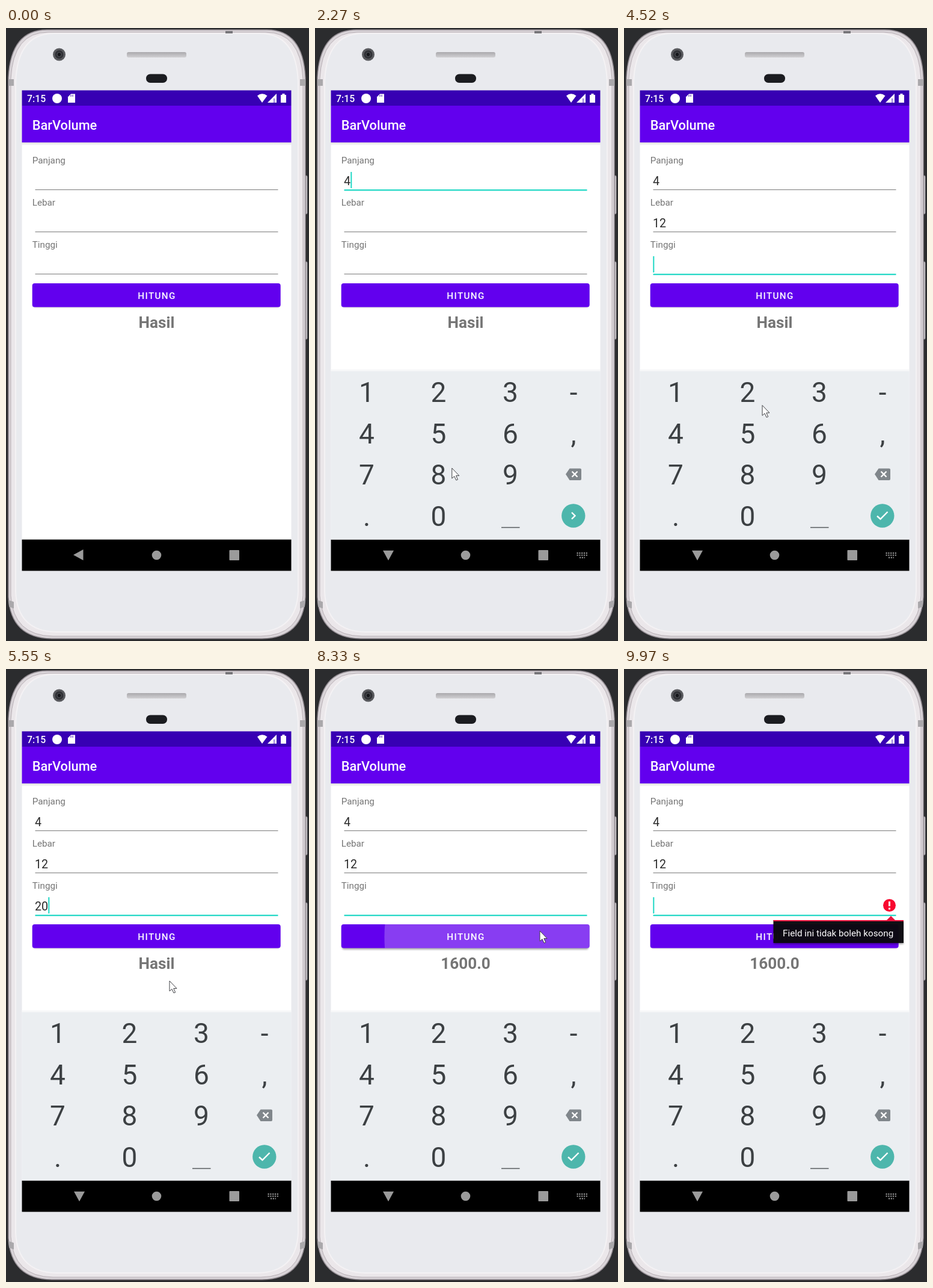
An HTML page that plays this animation: 504x1018 px, repeating every 10 s.

```html
<!DOCTYPE html>
<html lang="id">
<head>
<meta charset="utf-8">
<title>BarVolume</title>
<style>
  html, body { margin: 0; width: 100%; height: 100%; overflow: hidden; background: #2b2c2e; }
  svg { display: block; width: 100vw; height: 100vh; font-family: Roboto, sans-serif; }
  .medium { font-weight: 500; fill: #fff; }
  .label { font-size: 15.26px; fill: #757575; }
  .value { font-size: 19.6px; fill: #2a2a2a; }
  .key { font-size: 46px; fill: #3c4043; text-anchor: middle; }
  .mid { text-anchor: middle; }
  .line { fill: none; stroke: #fff; stroke-width: 2.4; }
</style>
</head>
<body>
<svg viewBox="0 0 504 1018">
  <defs>
    <clipPath id="screenClip"><rect x="26.500" y="103.500" width="448" height="798"/></clipPath>
    <clipPath id="buttonClip"><rect x="43.700" y="424" width="413" height="39.500" rx="4"/></clipPath>
    <linearGradient id="barShadow" x2="0" y2="1">
      <stop stop-color="#000" stop-opacity=".14"/><stop offset="1" stop-color="#000" stop-opacity="0"/>
    </linearGradient>
    <linearGradient id="speaker" x2="0" y2="1">
      <stop stop-color="#aaa9ac"/><stop offset="1" stop-color="#d2d1d4"/>
    </linearGradient>
    <filter id="blur" x="-10%" y="-50%" width="120%" height="200%"><feGaussianBlur stdDeviation="1.500"/></filter>
  </defs>

  <!-- phone body -->
  <rect width="504" height="1018" fill="#2b2c2e"/>
  <g fill="#cbc7cb" stroke="#8d8a90">
    <rect x="495" y="245" width="6" height="64" rx="2"/>
    <rect x="495" y="388" width="6" height="129" rx="2"/>
  </g>
  <path d="M4 82Q8 3 68 3H434Q494 3 498 82V945Q494 1013 426 1014H76Q8 1013 4 945Z" fill="#d9d4d8" stroke="#928b91" stroke-width="1.500"/>
  <path d="M8 84Q12 7 70 7H432Q490 7 494 84V943Q490 1009 424 1010H78Q12 1009 8 943Z" fill="#ebe7ea" stroke="#b8afb5"/>
  <path d="M16 90Q19 9 80 9H422Q483 9 486 90V936Q483 1002 418 1003H84Q19 1002 16 936Z" fill="#e9eaee" stroke="#f4f2f4" stroke-width="2"/>
  <path d="M4 85H13V96H4M498 85H489V96H498M4 950L13 953V964L5 961M498 950L489 953V964L497 961" fill="#aaa8ab"/>
  <path d="M365 7H377" stroke="#77767a" stroke-width="4"/>
  <circle cx="88.500" cy="44" r="10.500" fill="#58595d"/>
  <circle cx="88.500" cy="44" r="7" fill="#303136"/>
  <circle cx="88.500" cy="44" r="3.500" fill="#15161a" stroke="#55575c"/>
  <rect x="201" y="40" width="99" height="9" rx="3" fill="url(#speaker)"/>
  <rect x="233" y="76.500" width="35" height="14.500" rx="7" fill="#1b1c20"/>

  <g clip-path="url(#screenClip)">
    <rect x="26" y="103" width="449" height="799" fill="#fff"/>
    <rect x="26" y="190" width="449" height="5" fill="url(#barShadow)"/>
    <rect x="26" y="129" width="449" height="61" fill="#6200ee"/>
    <rect x="26" y="103" width="449" height="26" fill="#3700b3"/>
    <text class="medium" x="35" y="122.700" font-size="15.800">7:15</text>
    <g fill="#fff">
      <circle cx="85" cy="117" r="8"/>
      <path d="M108 109.500H115V124H103V114.500Z"/>
      <path d="M418 112.500Q426 106 434.500 112.500L426 124Z"/>
      <path d="M450 109V124H435Z"/>
      <path d="M457 111H459.500V109H463.500V111H466V124H457Z"/>
    </g>
    <path d="M108 111V114M111 111V114M446 117V124" stroke="#3700b3"/>
    <text class="medium" x="43.700" y="168.500" font-size="21.800">BarVolume</text>

    <g id="form"></g>

    <rect id="shadow" x="45" width="410" height="38" rx="4" filter="url(#blur)"/>
    <g clip-path="url(#buttonClip)">
      <rect x="43" y="424" width="414" height="40" fill="#6200ee"/>
      <circle id="ripple" cy="445" fill="#fff"/>
    </g>
    <text class="medium mid" x="251" y="450" font-size="15.260" letter-spacing="1.360">HITUNG</text>
    <text id="result" class="mid" x="250.500" y="498" font-size="26.150" font-weight="700" fill="#757575"></text>

    <g id="error">
      <circle cx="441.500" cy="392.500" r="10.500" fill="#f8072f"/>
      <path d="M441.500 386V394M441.500 396.500V399.500" stroke="#fff" stroke-width="3"/>
      <rect x="249" y="420" width="216" height="37" opacity=".35" filter="url(#blur)"/>
      <rect x="248.500" y="417" width="216.500" height="38" fill="#0c0a10" opacity=".97"/>
      <path d="M248.500 417H437L444 410L451 417H465V419H248.500Z" fill="#e8123c"/>
      <text x="264" y="444" font-size="15.260" fill="#fff">Field ini tidak boleh kosong</text>
    </g>

    <rect x="26" y="849.500" width="449" height="52.500"/>
    <g id="keyboard">
      <rect x="26" y="567" width="449" height="3" fill="#f6f7f8"/>
      <rect x="26" y="570" width="449" height="279.500" fill="#ebeef1"/>
      <g id="keys"></g>
      <path d="M310 829.500H340.500" stroke="#55595c" stroke-width="1.300"/>
      <path d="M417 741L423.500 731.500H441Q443 731.500 443 733.500V749Q443 751 441 751H423.500Z" fill="#80868b"/>
      <path class="line" d="M427.500 736.500L436.500 745.500M436.500 736.500L427.500 745.500"/>
      <circle cx="429.800" cy="810" r="19.700" fill="#4db6ac"/>
      <path id="action" class="line"/>
    </g>
    <g fill="#9b9b9b">
      <path id="back" d="M112 875L128.500 866V884Z"/>
      <circle cx="250.500" cy="875.500" r="7.800"/>
      <rect x="371.500" y="867" width="16.500" height="17" rx="1"/>
      <path id="imeIcon" d="M435.500 872H453M435.500 875.500H453M440 879.500H449" stroke="#9b9b9b" stroke-width="2" stroke-dasharray="2.200 1.600"/>
    </g>
  </g>
  <path id="pointer" d="M0 0V17L4 13.500L7 20L9.700 19L6.800 12.500H12Z" fill="#fff" stroke="#3f4044"/>
</svg>

<script>
const LOOP = 10000;
const $ = id => document.getElementById(id);
const set = (el, attrs) => { for (const k in attrs) el.setAttribute(k, attrs[k]); };
const clamp = v => Math.max(0, Math.min(1, v));
const progress = (t, start, length) => clamp((t - start) / length);
const latest = (steps, t) => steps.filter(s => s[0] <= t).pop()[1];

const FIELDS = [
  ["Panjang", [[0, ""], [1950, "4"]]],
  ["Lebar", [[0, ""], [3330, "1"], [3650, "12"]]],
  ["Tinggi", [[0, ""], [4750, "2"], [5210, "20"], [7480, "2"], [7750, ""]]]
];
const FOCUS = [[0, -1], [1130, 0], [2700, 1], [4150, 2]];
const RESULT = [[0, "Hasil"], [6240, "1600.0"]];
const PRESSES = [[6120, 250], [8230, 374]];
const KEYBOARD_IN = 1150, ERROR_IN = 8430;
const TEAL = "#1fd8c5";

// time, x, y
const POINTER = [
  [880, 300, 1030], [1080, 230, 256], [1270, 230, 276], [1750, 86, 678], [2050, 86, 678],
  [2550, 429, 806], [2780, 429, 806], [3180, 86, 602], [3360, 86, 602], [3480, 201, 604],
  [3720, 201, 604], [4050, 429, 806], [4220, 429, 806], [4600, 205, 604], [4800, 205, 604],
  [5000, 211, 790], [5060, 214, 802], [5250, 214, 802], [5550, 272, 518], [5950, 250, 445],
  [6300, 250, 445], [6850, 238, 476], [7050, 238, 476], [7400, 431, 741], [7850, 431, 741],
  [8200, 374, 435], [9400, 374, 435], [9850, -20, 760]
];

$("form").innerHTML = FIELDS.map(([name], i) => {
  const y = 70 * i;
  return `<text class="label" x="43.7" y="${224.5 + y}">${name}</text>
    <text class="value" x="48" y="${260.7 + y}"></text>
    <rect class="rule" x="48.5" width="404"/>
    <rect class="caret" y="${239 + y}" width="2" height="27" fill="${TEAL}"/>`;
}).join("");
const all = name => [...document.querySelectorAll("." + name)];
const values = all("value"), rules = all("rule"), carets = all("caret");

$("keys").innerHTML = ["123-", "456,", "789", ".0"].map((row, r) =>
  [...row].map((key, c) =>
    `<text class="key" x="${[86, 205.5, 325, 430][c]}" y="${[621, 690, 758, 826.5][r]}">${key}</text>`
  ).join("")).join("");

const edits = [...FOCUS, ...FIELDS.flatMap(f => f[1])].map(s => s[0]);

function drawForm(t) {
  const focus = latest(FOCUS, t);
  const lastEdit = Math.max(...edits.filter(e => e <= t));
  const caretOn = Math.floor((t - lastEdit) / 500) % 2 === 0;
  FIELDS.forEach(([, steps], i) => {
    const text = latest(steps, t), active = i === focus;
    values[i].textContent = text;
    set(rules[i], {
      y: 268.1 + 70 * i,
      height: active ? 2.2 : 1,
      fill: active ? TEAL : "#777"
    });
    set(carets[i], { x: 48.3 + 11 * text.length, opacity: +(active && caretOn) });
  });
  set($("action"), { d: focus < 2 ? "M427 804.500L432.500 810L427 815.500" : "M421 810.500L426.500 815.500L438.500 803.500" });
  $("result").textContent = latest(RESULT, t);
  set($("error"), { opacity: progress(t, ERROR_IN, 100) });
}

function drawButton(t) {
  const [start, x] = PRESSES.filter(p => p[0] <= t).pop() || [LOOP, 0];
  const age = Math.max(0, t - start);
  const fade = t < start ? 0 : 1 - progress(age, 200, 250);
  set($("ripple"), { cx: x, r: age * 2.56, opacity: 0.24 * fade });
  set($("shadow"), { y: 426 + 2 * fade, opacity: 0.22 + 0.1 * fade });
}

function drawKeyboard(t) {
  const u = progress(t, KEYBOARD_IN, 250);
  set($("keyboard"), {
    transform: `translate(0 ${60 * (1 - u) ** 2.5})`,
    opacity: clamp(u * 2.5)
  });
  set($("back"), { transform: `rotate(${270 * (1 - (1 - u) ** 1.7)} 121.6 874.6)` });
  set($("imeIcon"), { opacity: clamp(u * 2.5) });
}

function drawPointer(t) {
  const next = POINTER.findIndex(p => p[0] > t);
  set($("pointer"), { opacity: +(next > 0) });
  if (next < 1) return;
  const [t0, x0, y0] = POINTER[next - 1], [t1, x1, y1] = POINTER[next];
  const u = (t - t0) / (t1 - t0), e = u * u * (3 - 2 * u);
  set($("pointer"), { transform: `translate(${x0 + (x1 - x0) * e} ${y0 + (y1 - y0) * e})` });
}

function frame() {
  const t = performance.now() % LOOP;
  drawForm(t);
  drawButton(t);
  drawKeyboard(t);
  drawPointer(t);
  requestAnimationFrame(frame);
}
frame();
</script>
</body>
</html>
```
